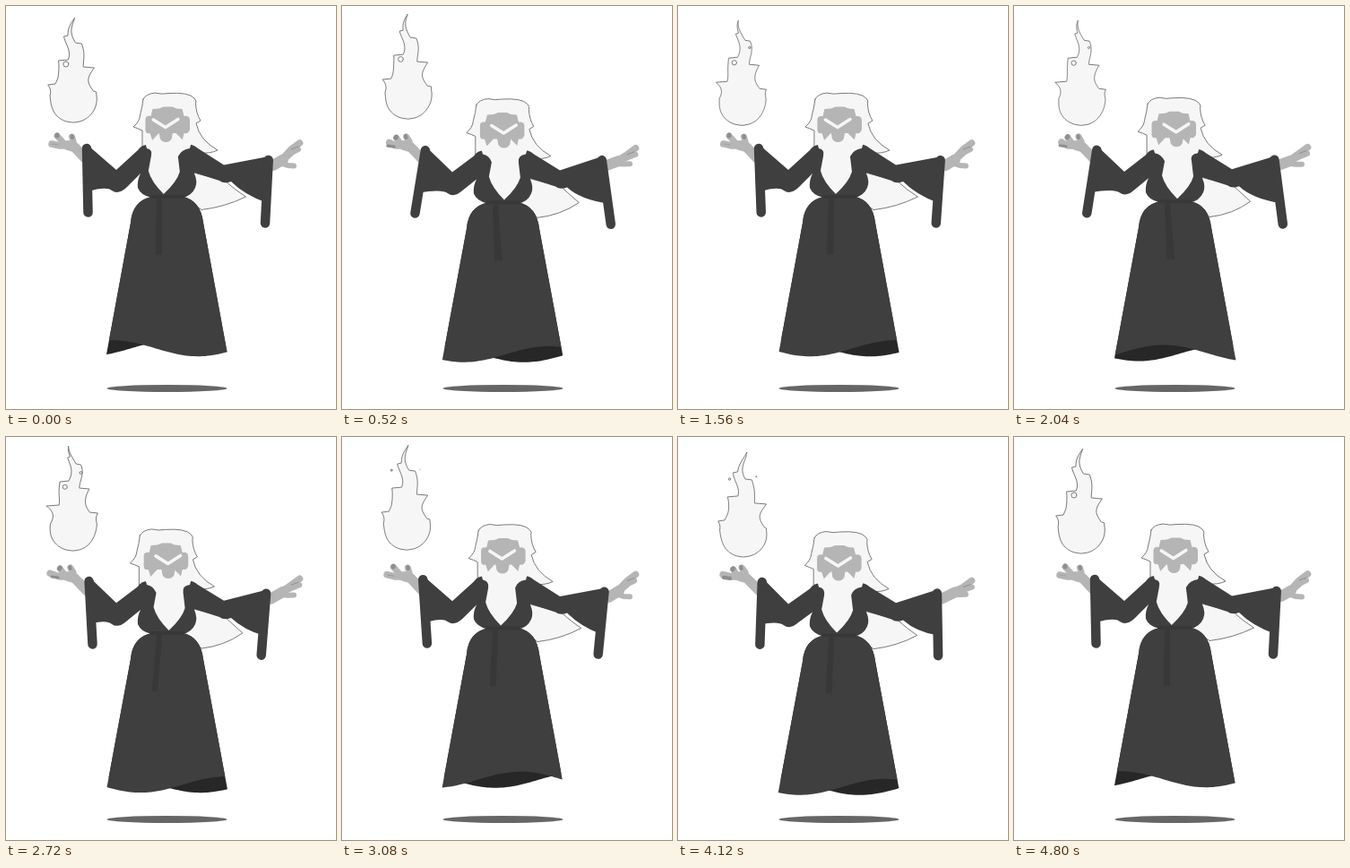
An HTML page with a canvas that plays this animation: 368x450 px, repeating every 4.84 s.

```html
<!DOCTYPE html>
<html lang="en">
<head>
<meta charset="utf-8">
<title>Floating wizard</title>
<style>
html, body { margin: 0; width: 100%; height: 100%; overflow: hidden; background: #fff; }
canvas { display: block; }
</style>
</head>
<body>
<canvas id="stage" width="368" height="450"></canvas>
<script>
const ctx = document.getElementById('stage').getContext('2d');
const LOOP = 4840, STEP = 40, CYCLE = 4800, TAU = Math.PI * 2;
const ROBE = '#3f3f3f', SASH = '#383838', LINING = '#272727';
const WHITE = '#f6f6f6', SKIN = '#b5b5b5', SHADE = '#8e8e8e', LINE = '#7a7a7a';

function shape(d, fill, line) {
  const p = new Path2D(d);
  ctx.fillStyle = fill;
  ctx.fill(p);
  if (line) {
    ctx.strokeStyle = line;
    ctx.lineWidth = 1;
    ctx.stroke(p);
  }
}

function bar(points, width, color) {
  ctx.beginPath();
  points.forEach(([x, y]) => ctx.lineTo(x, y));
  ctx.strokeStyle = color;
  ctx.lineWidth = width;
  ctx.lineCap = ctx.lineJoin = 'round';
  ctx.stroke();
}

function dot(x, y, r, fill, line) {
  ctx.beginPath();
  ctx.arc(x, y, Math.max(r, 0), 0, TAU);
  ctx.fillStyle = fill;
  ctx.fill();
  ctx.strokeStyle = line;
  ctx.lineWidth = 1;
  ctx.stroke();
}

const mix = (a, b, k) => [a[0] + (b[0] - a[0]) * k, a[1] + (b[1] - a[1]) * k];

function keyed(v, at, val) {
  let i = 1;
  while (i < at.length - 1 && v > at[i]) i++;
  return val[i - 1] + (val[i] - val[i - 1]) * (v - at[i - 1]) / (at[i] - at[i - 1]);
}

// Flame: a bulb whose pointed licks and swaying tip travel upwards.
function flame(ms) {
  const a = ms / CYCLE * 2 * TAU;
  const cx = 72.5 + 3.2 * Math.cos(a) - 0.8 * Math.cos(2 * a) - 0.4 * Math.sin(a);
  const base = 130 - 4 * Math.sin(a), top = 117, bulb = 30;
  const rise = keyed(ms, [0, 1080, 2040, 2720, 3480, 4120, 4800],
    [0, 2.22, 4.19, 5.26, 6.82, 7.91, 9]);
  const f = rise % 1;

  const sway = h => -5 * (h / top) ** 1.2 * Math.sin(TAU * (rise - 0.06 + (top - h) / 55));
  const half = (h, offset) => {
    const w = h < bulb ? 26 * Math.sqrt(1 - ((bulb - h) / bulb) ** 2.4)
                       : 26 * (1 - (h - bulb) / (top - bulb)) ** 1.4;
    const u = ((h - offset) / 27 - rise) % 1;
    const lick = ((u + 1) % 1) ** 2;
    const amp = 14 * Math.min(1, Math.max(0, (h - 30) / 20)) * Math.min(1, (top - h) / 60);
    return Math.max(w + amp * (lick - 0.25), 1.2 * (1 - h / top));
  };

  ctx.beginPath();
  for (let h = 0; h <= top; h++) ctx.lineTo(cx + sway(h) - half(h, 16), base - h);
  for (let h = top; h >= 0; h--) ctx.lineTo(cx + sway(h) + half(h, 8), base - h);
  ctx.closePath();
  ctx.fillStyle = WHITE;
  ctx.fill();
  ctx.strokeStyle = LINE;
  ctx.lineWidth = 1;
  ctx.lineJoin = 'round';
  ctx.stroke();

  dot(cx - 8 - 9 * f * f, base - 65 - 24 * f, 3 * (1 - 0.65 * f), '#fff', LINE);
  if (f > 0.08) dot(cx + 7 + 8 * f, base - 86 - 4 * f, 2 * Math.sin(Math.PI * f), WHITE, LINE);
}

function skirt(ms, b, s) {
  const p = ms / CYCLE * 4 % 1;
  const crest = keyed(p, [0, 0.267, 0.433, 0.7, 0.9, 1], [309, 245, 231, 167, 167, 119]);
  const wave = (x, c) => Math.cos(TAU * (x - c) / 190);
  const front = x => 382.2 + b - 9 * wave(x, crest);
  const back = x => 382.5 + b + 8.8 * wave(x, crest - 28);
  const cloth = (hem, color) => {
    let d = 'M105 200';
    for (let x = 105; x <= 255; x += 3) d += `L${x} ${hem(x)}`;
    shape(d + 'L255 200Z', color);
  };
  // Both hems share the side seams.
  ctx.save();
  ctx.clip(new Path2D(`M163 ${213 + b}Q141 ${217 + b} 139 ${242 + b}
    L112 ${389 + 0.8 * b}L109 405H250L247 ${389 + 0.8 * b}
    L220 ${242 + b}Q217 ${217 + b} 197 ${213 + b}Z`));
  cloth(back, LINING);
  cloth(front, ROBE);
  ctx.restore();
  bar([[170, 217 + b], [168.5 + 4 * s, 276 + b]], 4, SASH);
  bar([[172, 217 + b], [172 + 5 * s, 276 + b]], 4, SASH);
}

function hands(c, s, left, right) {
  // Left: cupped under the flame, opening as the body rises.
  const o = (1 + c) / 2, [wx, wy] = left;
  bar([[wx - 2, wy + 11], [77, 158], [69, 155.5]], 11, SKIN);
  bar([[68, 156], [60, 156], [51 + 2 * s, 154 - 2 * (1 - c * c)]], 7.5, SKIN);
  bar([[66, 155], [62 - 5 * o, 148 - 3 * o]], 7, SKIN);
  bar([[76, 157], [75, 151], [71 + 2.5 * o, 146]], 7, SKIN);
  bar([[62 - 5 * o, 147 - 3 * o], [61 - 4 * o, 148 - 3 * o]], 5, SHADE);
  bar([[70 + 3.5 * o, 145], [70.5 + 3.5 * o, 147]], 4, SHADE);
  bar([[51, 157 - 3 * o], [58, 158 - 3 * o]], 4 * (1 - o) + 0.5, SHADE);

  // Right: stretched out sideways.
  const tip = 157 - 4 * c;
  bar([[right[0] + 5, right[1] + 6], [309, 172.5 - c]], 12, SKIN);
  bar([[309, 171 - c], [318, tip + 7], [327.5, tip]], 7.5, SKIN);
  bar([[311, 172 - c], [320, tip + 10], [327 - c, tip + 7]], 6, SKIN);
  bar([[308, 176], [314, 177 + c], [321, 177 + 1.5 * c]], 6, SKIN);
  bar([[318, tip + 7], [326, tip + 4]], 1, SHADE);
}

function arms(b, left, right, leftEnd, rightEnd) {
  const [lx, ly] = mix(left, leftEnd, 0.66), [rx, ry] = mix(right, rightEnd, 0.66);
  shape(`M166 ${156 + b}Q153 ${152 + b} 147 ${161 + b}L123 ${183 + 0.4 * b}
    L${left[0] + 3} ${left[1] - 2}L${lx} ${ly + 1}Q112 ${201 + 0.5 * b} 118 ${206 + 0.5 * b}
    Q125 ${211 + 0.5 * b} 134 ${203 + 0.5 * b}L150 ${187 + b}L176 ${190 + b}Z`, ROBE);
  shape(`M195 ${156 + b}Q206 ${152 + b} 214 ${159 + b}L243 ${177.5 + 0.9 * b}
    L${right[0]} ${right[1] - 4}L${rx} ${ry + 1}Q266 ${211 + 0.8 * b} 251 ${196 + b}
    Q243 ${199 + b} 238 ${195 + b}L210 ${186 + b}L180 ${190 + b}Z`, ROBE);
  bar([left, leftEnd], 10.5, ROBE);
  bar([right, rightEnd], 10.5, ROBE);
}

function hair(k) {
  ctx.save();
  ctx.translate(2 * k - 2, 0);
  shape(`M153 104Q156 98 166 97Q174 99 181 97.5Q204 96 210 103Q213 106 211.5 109
    Q212 120 217 128L212 131Q216 150 236 161Q228 165 215 164L206 172H152L152 139
    Q148 137 142 135Q149 129 149.5 122Q152 113 153 104Z`, WHITE, LINE);
  ctx.restore();
}

function face(k) {
  const tip = 179 - 3.2 * k;
  shape(`M154 148L157 159Q164 160 ${tip - 14} 168L${tip - 17} 184Q${tip - 14} 196 ${tip} 210
    Q${tip + 15} 196 ${tip + 18} 185L${tip + 16} 168Q196 160 205 159L208 148Z`, WHITE);
  ctx.save();
  ctx.translate(k - 1.5, 0);
  shape(`M164 115Q172 115 176 112.5H186Q190 115 197 115L199 123Q205 122 205.5 127V138
    Q204 143 199 142L197 151L188 144H173L164 151L161 142Q156 143 156 138V127
    Q156 122 162 123Z`, SKIN);
  shape('M158 156L171 142H190L204 156Z', WHITE);
  ctx.translate(0.8 - 2.5 * k, 0);
  shape('M172 137H189L187 148Q185 152 180.5 152Q176 152 174 148Z', SKIN);
  bar([[166.5, 127], [180, 135.5], [194, 126.5]], 3.6, WHITE);
  ctx.restore();
}

function draw(ms) {
  const a = ms / CYCLE * 3 * TAU, c = Math.cos(a), s = Math.sin(a), k = Math.cos(2 * a);
  const b = 4.5 * (1 - c);
  const left = [92 - 2 * c, 159 + 0.35 * b];
  const leftEnd = [89.5 + 2 * c - 8 * s, 230.5 + 0.15 * b];
  const right = [290.7 + 2 * c, 173 - c - 1.5 * s];
  const rightEnd = [291.5 - 2.5 * c + 8 * s, 242.5 + 0.2 * b];

  ctx.fillStyle = '#fff';
  ctx.fillRect(0, 0, 368, 450);
  ctx.beginPath();
  ctx.ellipse(179.5, 427, 67, 4, 0, 0, TAU);
  ctx.fillStyle = '#666';
  ctx.fill();

  flame(ms);
  const tail = 213 + b, low = 229 + b - 1.5 * k;
  shape(`M205 ${185 + b}L244 ${195 + b}Q256 ${206 + b} ${265.5 + 2 * k} ${tail}
    Q244 ${low - 3} 218 ${low}L200 ${215 + b}Z`, WHITE, LINE);
  skirt(ms, b, s);
  hands(c, s, left, right);

  ctx.save();
  ctx.translate(0, b);
  hair(k);
  ctx.restore();

  arms(b, left, right, leftEnd, rightEnd);
  ctx.save();
  ctx.translate(0, b);
  shape(`M150 160H210V187Q214 196 211 203Q207 212 197 214H162Q150 211 147 203
    Q146 195 150 187Z`, ROBE);
  bar([[162, 213], [197, 213]], 4, SASH);
  face(k);
  ctx.restore();
}

const start = performance.now();
function tick() {
  const t = (performance.now() - start) % LOOP;
  draw(Math.floor(t / STEP) * STEP);
  requestAnimationFrame(tick);
}
tick();
</script>
</body>
</html>
```
